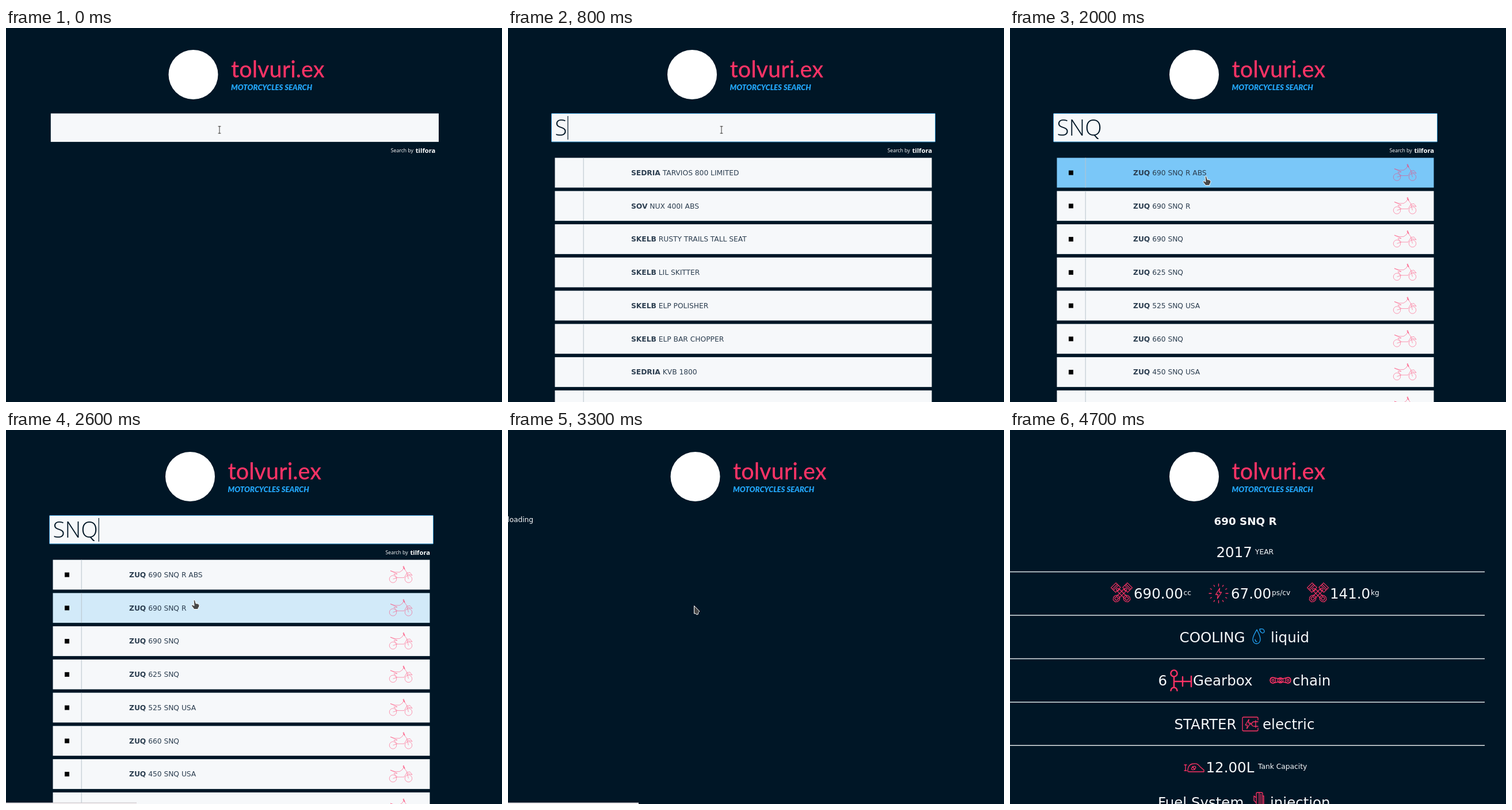
Recreate the animation shown at these times as an HTML page. Size 862 px wide and 650 px high, loop 5.9 s.

```html
<!DOCTYPE html>
<html lang="en">
<head>
<meta charset="utf-8">
<title>Motorcycles search</title>
<style>
  html, body { margin: 0; width: 100%; height: 100%; overflow: hidden; background: #001626; }
  svg { display: block; }
  text { font-family: "DejaVu Sans", sans-serif; white-space: pre; }
  .brand { font: 500 39.5px Lato, sans-serif; fill: #ff3366; }
  .tagline { font: italic 900 13.1px Lato, sans-serif; fill: #22a4f6; }
  .by { font: 8.7px "Open Sans", sans-serif; fill: #fff; }
  .provider { font: 700 11.2px "Open Sans", sans-serif; fill: #fff; }
  .query { font: 300 38.5px "Open Sans", sans-serif; fill: #001626; }
  .row { font-size: 12.25px; fill: #2c3e50; }
  .big { font-size: 24.5px; fill: #f6f8fa; }
  .small { font-size: 12.25px; fill: #f6f8fa; }
  .title { font-size: 18.3px; font-weight: 700; fill: #f6f8fa; }
  .icon { fill: none; stroke: #ff3366; stroke-width: 1.3; stroke-linejoin: round; stroke-linecap: round; }
</style>
</head>
<body>
<svg id="stage" width="862" height="650" viewBox="0 0 862 650">
  <defs>
    <g id="bike" fill="none" stroke="#ff3366" stroke-width=".7" stroke-opacity=".7" stroke-linejoin="round">
      <circle cx="6.5" cy="33.5" r="6.2"/>
      <circle cx="33.5" cy="33.5" r="6.2"/>
      <path d="M2 19L10 21.5H18L23 18L25 14L31 22.5L26 31H14L8 25L14 24.5L2 19M30 23L36 22L40 27L31 24.5L33.5 33.5M6.5 33.5L14 31"/>
      <path d="M27 17l-3-5 1-1 2 5" stroke-width="1"/>
    </g>
    <g id="piston">
      <path d="M-7-23H7V-10H-7ZM-7-19H7M-7-16H7M-3-10V11M3-10V11"/>
      <circle cy="-11" r="2.6"/>
      <path d="M-6 12L-3 8H3L6 12V17L3 21H-3L-6 17Z"/>
      <circle cy="14.5" r="3.2"/>
    </g>
    <g id="engine" transform="scale(.87)">
      <use href="#piston" transform="rotate(45)"/>
      <use href="#piston" transform="rotate(-45)"/>
    </g>
    <path id="bolt" d="M2-9L-5 2H-1L-2 9L5-2H1Z"/>
  </defs>

  <g id="header">
    <circle cx="320" cy="81" r="43" fill="#fff"/>
    <text class="brand" x="385.5" y="86">tolvuri.ex</text>
    <text class="tagline" x="385.5" y="108">MOTORCYCLES SEARCH</text>
  </g>

  <g id="search">
    <rect id="field" y="148.5" height="49.4" fill="#f6f8fa"/>
    <text id="query" class="query" y="187"></text>
    <rect id="caret" y="153" width="1.2" height="41" fill="#001626"/>
    <g id="credit">
      <text class="by" x="659.5" y="216">Search by</text>
      <text class="provider" x="737" y="216.5" text-anchor="end">tilfora</text>
    </g>
  </g>

  <g id="results"></g>
  <text id="loading" class="small" x="-1" y="160">loading</text>
  <g id="details"></g>
  <g id="status">
    <rect y="648" width="227" height="2" fill="#f4eff1"/>
    <rect y="647.5" width="227" height=".7" fill="#b9b6ba"/>
  </g>

  <g id="beam" fill="none" stroke-linecap="square">
    <path d="M-2-6H2M-2 6H2M0-6V6" stroke="#fff" stroke-width="2.6"/>
    <path d="M-2-6H2M-2 6H2M0-6V6" stroke="#333" stroke-width="1"/>
  </g>
  <path id="hand" fill="#484848" stroke="#fff" stroke-width="1" stroke-linejoin="round"
        d="M-1 0.5Q0-.5 1.5.5L3 6 7 6.5 9 9 8.5 12 7 13.5V16H0L-4.5 10Q-4.5 8-2.5 8.5L0 10Z"/>
  <path id="arrow" fill="#484848" stroke="#fff" stroke-width="1" stroke-linejoin="round"
        d="M0 0V13.5H3L4.5 15.5 7 14.5V12L9.3 9.5Z"/>
</svg>
<script>
const LOOP = 5900, STEP = 100;
const $ = id => document.getElementById(id);
const set = (el, attrs) => { for (const k in attrs) el.setAttribute(k, attrs[k]); };
const show = (el, on) => set(el, { display: on ? "inline" : "none" });
const last = (keys, t) => keys.filter(k => k[0] <= t).pop();

const brandsList = [
  ["SEDRIA", "TARVIOS 800 LIMITED"], ["SOV", "NUX 400I ABS"],
  ["SKELB", "RUSTY TRAILS TALL SEAT"], ["SKELB", "LIL SKITTER"],
  ["SKELB", "ELP POLISHER"], ["SKELB", "ELP BAR CHOPPER"],
  ["SEDRIA", "KVB 1800"], ["SEDRIA", "KVB 1600"]
];
const modelsList = ["690 SNQ R ABS", "690 SNQ R", "690 SNQ", "625 SNQ",
  "525 SNQ USA", "660 SNQ", "450 SNQ USA", "450 SNQ"].map(m => ["ZUQ", m]);

// time, query, list, icons loaded
const queries = [
  [0, "", null, false], [800, "S", brandsList, false], [900, "S", brandsList, true],
  [1000, "SN", modelsList, false], [1100, "SNQ", modelsList, false], [1200, "SNQ", modelsList, true]
];

// time, pointer shape, x, y
const pointer = [
  [0, "beam", 371, 177], [1700, "beam", 369, 186], [1800, "arrow", 359, 214],
  [1900, "hand", 346, 246], [2000, "hand", 340, 257.5], [2500, "arrow", 332, 280],
  [2600, "hand", 327, 295.5], [2700, "hand", 325, 302], [2800, "hand", 324, 305.5],
  [3300, "arrow", 323.5, 305.5], [4300, "arrow", 334, 275], [4400, "arrow", 358, 200],
  [4500, "arrow", 394, 112], [4600, "arrow", 422, 48], [4700, "none", 0, 0]
];

// time, strength of the highlight for each row
const hovers = [
  [[0, 0], [1900, .2], [2000, .585], [2100, .88], [2200, 1], [2500, .4], [2600, 0]],
  [[0, 0], [2600, .17], [2700, .56], [2800, .87], [2900, 1]]
];

const rowTop = i => 225.6 + 57.75 * i;
$("results").innerHTML = modelsList.map((_, i) => `
  <g transform="translate(0 ${rowTop(i)})">
    <rect class="bar" x="81.5" width="655" height="51.8"/>
    <path d="M131.2 0V51.8" stroke="#b9c3ca"/>
    <text class="row" x="214" y="30.2"></text>
    <g class="extras">
      <rect x="102" y="22" width="8" height="8" fill="#000"/>
      <use href="#bike" x="666"/>
    </g>
  </g>`).join("");
const rows = [...$("results").children].map(g => ({
  bar: g.querySelector(".bar"), label: g.querySelector("text"), extras: g.querySelector(".extras")
}));

const label = (cls, x, y, s) => `<text class="${cls}" x="${x}" y="${y}">${s}</text>`;
const big = (x, y, s) => label("big", x, y, s);
const small = (x, y, s) => label("small", x, y, s);
const icon = (x, y, body, extra = "") => `<g class="icon" transform="translate(${x} ${y})" ${extra}>${body}</g>`;
const ring = (x, y, r) => `<circle cx="${x}" cy="${y}" r="${r}"/>`;
const line = d => `<path d="${d}"/>`;
const rays = Array.from({ length: 12 }, (_, i) =>
  `<path d="M0 ${i % 3 ? -14 : -12.5}V-16.5" transform="rotate(${i * 30})"/>`).join("");

$("details").innerHTML = [
  `<text class="title" x="409" y="165" text-anchor="middle">690 SNQ R</text>`,
  big(358.5, 221, "2017"), small(426, 215.5, "YEAR"),
  icon(194, 284, `<use href="#engine"/>`), big(215, 293, "690.00"), small(301.5, 287, "cc"),
  icon(362.5, 284, rays + `<use href="#bolt"/>`), big(384, 293, "67.00"), small(455, 287, "ps/cv"),
  icon(535, 284, `<use href="#engine"/>`), big(556, 293, "141.0"), small(627, 287, "kg"),
  big(294.6, 368.5, "COOLING"),
  icon(429, 359, line("M0-12C-3-6-7-1-7 5A6.5 7.5 0 0 0 6 5C6-1 3-6 0-12ZM-3 5Q-3 8 0 9M5-13Q13-15 13-8Q11-5 8-7Q5-9 5-13Z"),
    `style="stroke:#22a4f6"`),
  big(453, 368.5, "liquid"),
  big(257.5, 444, "6"),
  icon(285, 435, ring(0, -12, 5.6) + line("M0-6V12M-5.5 18A5.5 5.5 0 0 1 5.5 18M0 2H30M15-6V10M30-7V11"),
    `style="stroke-width:2.4"`),
  big(318, 444, "Gearbox"),
  icon(470, 435, [-13, 0, 13].map(x => ring(x, 0, 4.6) + ring(x, 0, 1.8)).join("") +
    line("M-13-5Q-18-5-18 0T-13 5L-5 3H5L13 5Q18 5 18 0T13-5L5-3H-5Z")),
  big(491, 444, "chain"),
  big(285.5, 519.5, "STARTER"),
  icon(417, 511, line("M14-7V-10Q14-12 12-12H-11Q-13-12-13-10V10Q-13 12-11 12H12Q14 12 14 10V7") +
    `<use href="#bolt" x="-4" transform="scale(.9)"/>` +
    line("M14-4H8Q3-4 3 0T8 4H14M10-6V6M3 0H0")),
  big(439, 519.5, "electric"),
  icon(320, 587, line("M-17-5H-13M-15-5V5M-17 5H-13M-11 6Q-11-7 0-7Q6-8 10-2L17 4V7H-9Q-11 7-11 6Z") +
    `<ellipse cx="-1" cy="0" rx="4" ry="2.6" transform="rotate(-35)"/>` + line("M-3-2L1 3")),
  big(340.5, 595, "12.00L"), small(431, 589, "Tank Capacity"),
  big(257, 656, "Fuel System"),
  icon(432, 642, line("M-4 12V-10Q-4-12-2-12H5Q7-12 7-10V12M1-12V12M4-9V12M-4-3L-8-6V2L-4 6M7-6H9V8")),
  big(452, 656, "injection"),
  ...[246.4, 321.9, 397.5, 473, 548.3].map(y => `<path d="M0 ${y}H825" stroke="#dfe3e6" stroke-width="1.5"/>`)
].join("");

const mix = k => {
  const to = [34, 164, 246];
  return `rgb(${[246, 248, 250].map((c, i) => Math.round(c + (to[i] - c) * k))})`;
};

function drawSearch(t, wide) {
  const [, query, list, icons] = last(queries, t);
  const left = wide ? 77.8 : 75.5;
  const focused = t >= 300 && t < 3200;
  set($("field"), { x: left, width: wide ? 674.2 : 667, stroke: focused ? "#2b8fca" : "none", rx: focused ? 1 : 0 });
  set($("query"), { x: left + 6 });
  $("query").textContent = query;
  const caretOn = focused && (t < 1700 || (t >= 2300 && t < 2900));
  show($("caret"), caretOn);
  if (caretOn) set($("caret"), { x: left + 7 + (query ? $("query").getComputedTextLength() : 0) });
  set($("credit"), { transform: `translate(${wide ? 9.3 : 0} 0)` });

  show($("results"), list);
  if (!list) return;
  rows.forEach((row, i) => {
    const [brand, model] = list[i];
    row.label.innerHTML = `<tspan font-weight="700">${brand}</tspan> ${model}`;
    set(row.bar, { fill: mix(hovers[i] ? last(hovers[i], t)[1] : 0) });
    show(row.extras, icons);
  });
}

function draw(time) {
  const t = Math.floor(time / STEP) * STEP;
  const searching = t < 3300, loading = t === 3300, wide = t < 800 || loading;

  set($("header"), { transform: `translate(${wide ? 5.5 : 0} 0)` });
  show($("search"), searching);
  show($("results"), searching);
  show($("loading"), loading);
  show($("details"), t >= 3400);
  if (searching) drawSearch(t, wide);

  const fade = [[0, 0], [2200, .5], [2300, 1], [3600, .65], [3700, .3], [3800, 0]];
  set($("status"), { opacity: last(fade, t)[1] });

  const [, shape, x, y] = last(pointer, t);
  for (const id of ["beam", "hand", "arrow"]) {
    show($(id), id === shape);
    set($(id), { transform: `translate(${x} ${y})` });
  }
}

const start = performance.now();
function tick() {
  draw((performance.now() - start) % LOOP);
  requestAnimationFrame(tick);
}
tick();
</script>
</body>
</html>
```
